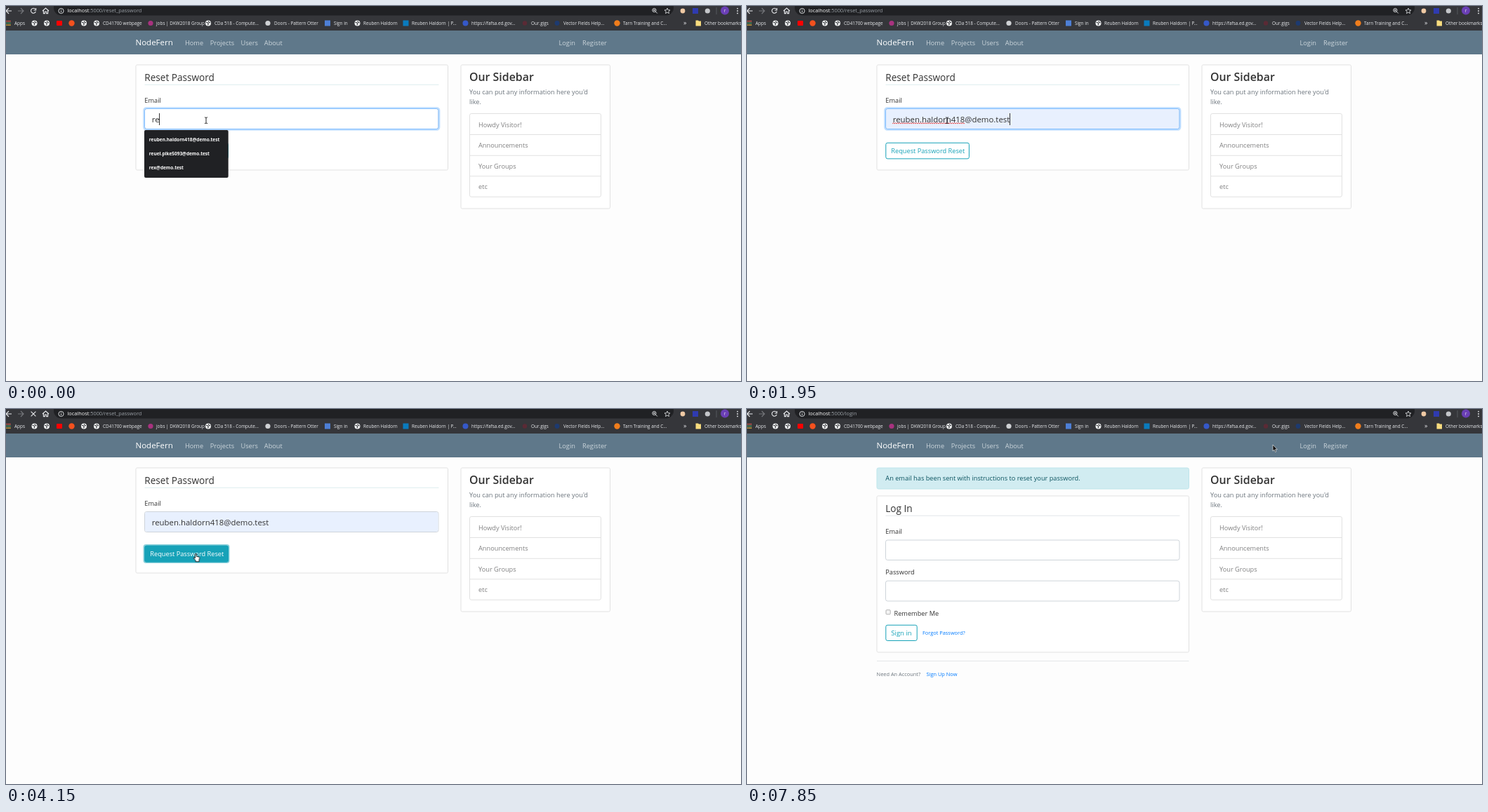
Animation of 1047 by 535 pixels, one loop 8000 ms. Source, as an HTML page:

```html
<!DOCTYPE html>
<html lang="en">
<head>
<meta charset="utf-8">
<title>Reset Password</title>
<style>
html, body { margin: 0; width: 100%; height: 100%; overflow: hidden; background: #fdfdfd; }
svg { display: block; width: 1047px; height: 535px; font: 9.22px "Open Sans", "Noto Sans", sans-serif; fill: #333; }
text { white-space: pre; }

.mark { font-size: 6.4px; fill: #e8eaed; }
.url { font-size: 7.35px; fill: #9aa0a6; }
.url tspan { fill: #fff; }
.icon { fill: none; stroke: #e8eaed; stroke-width: 1.1; }
.nav { fill: #cbd5db; }
.title { font-size: 13.6px; }
.small { font-size: 7.4px; }
.muted { fill: #6c757d; }
.item { fill: #818182; }
.link { fill: #007bff; }
.card { fill: #fff; stroke: #e1e1e1; }
.rule { stroke: #e3e6e8; }
.box { fill: #fff; stroke: #ced4da; }
.outline { fill: #fff; stroke: #17a2b8; }
.cyan { fill: #17a2b8; }
.typed { font-size: 11.4px; }
.drop { font-size: 6.5px; font-weight: 700; fill: #fff; }

/* Every track shares one 8 s clock; 1% is 80 ms. */
.k { animation: 8s step-end infinite; }
.smooth { animation: 8s linear infinite; }

.reset { animation-name: until6330; }
.login { animation-name: from6330; }
@keyframes until6330 { 0% { opacity: 1 } 79.125%, 100% { opacity: 0 } }
@keyframes from6330 { 0% { opacity: 0 } 79.125%, 100% { opacity: 1 } }

.w1 { animation-name: until710; }
.w2 { animation-name: w2; }
.w3 { animation-name: w3; }
.w4 { animation-name: w4; }
.w5 { animation-name: from1670; }
.row2 { animation-name: until890; }
.row3 { animation-name: until710; }
.list { animation-name: until1950; }
.pick { animation-name: from1670; }
.panel { animation-name: panel; }
@keyframes until710 { 0% { opacity: 1 } 8.875%, 100% { opacity: 0 } }
@keyframes until890 { 0% { opacity: 1 } 11.125%, 100% { opacity: 0 } }
@keyframes until1950 { 0% { opacity: 1 } 24.375%, 100% { opacity: 0 } }
@keyframes from1670 { 0% { opacity: 0 } 20.875%, 100% { opacity: 1 } }
@keyframes w2 { 0% { opacity: 0 } 8.875% { opacity: 1 } 11.125%, 100% { opacity: 0 } }
@keyframes w3 { 0% { opacity: 0 } 11.125% { opacity: 1 } 12.25%, 100% { opacity: 0 } }
@keyframes w4 { 0% { opacity: 0 } 12.25% { opacity: 1 } 20.875%, 100% { opacity: 0 } }
@keyframes panel { 0% { height: 68px } 8.875% { height: 48.5px } 11.125%, 100% { height: 29px } }

.caret { animation-name: caretx, blink; }
@keyframes caretx {
  0% { transform: translateX(218px) } 8.875% { transform: translateX(226px) }
  11.125% { transform: translateX(239px) } 12.25% { transform: translateX(246px) }
  24.375%, 100% { transform: translateX(374px) }
}
@keyframes blink {
  0% { opacity: 1 } 5% { opacity: 0 } 8.875% { opacity: 1 } 19.625% { opacity: 0 }
  24.375% { opacity: 1 } 31.75% { opacity: 0 } 38.375% { opacity: 1 } 44.625%, 100% { opacity: 0 }
}
.spell { animation-name: spell; }
@keyframes spell { 0% { opacity: 0 } 24.375% { opacity: 1 } 49.75%, 100% { opacity: 0 } }

.focus { animation-name: blur; }
@keyframes blur { 0%, 49.75% { opacity: 1 } 51.875%, 100% { opacity: 0 } }
.hover { animation-name: hover; }
@keyframes hover { 0%, 39% { opacity: 0 } 40.9%, 100% { opacity: 1 } }
.ring { animation-name: ring; }
@keyframes ring { 0%, 49.75% { opacity: 0 } 51.875%, 100% { opacity: 1 } }

.path1 { animation-name: until5780; }
.path2 { animation-name: from5780; }
@keyframes until5780 { 0% { opacity: 1 } 72.25%, 100% { opacity: 0 } }
@keyframes from5780 { 0% { opacity: 0 } 72.25%, 100% { opacity: 1 } }
.idle { animation-name: idle; }
.busy { animation-name: busy; }
@keyframes idle { 0% { opacity: 1 } 49.75% { opacity: 0 } 92.375%, 100% { opacity: 1 } }
@keyframes busy { 0% { opacity: 0 } 49.75% { opacity: 1 } 92.375%, 100% { opacity: 0 } }

.mouse { animation-name: mouse; }
@keyframes mouse {
  0%, 33% { transform: translate(285px, 163px) }
  41.25% { transform: translate(272px, 204px) }
  43.5% { transform: translate(270.5px, 206px); animation-timing-function: step-end }
  92.375% { transform: translate(300px, 195px); animation-timing-function: step-end }
  93.5% { transform: translate(372px, 167px); animation-timing-function: step-end }
  94.625% { transform: translate(443px, 140px); animation-timing-function: step-end }
  96.875% { transform: translate(600px, 95px); animation-timing-function: step-end }
  98.125%, 100% { transform: translate(749px, 51px) }
}
.beam { animation-name: beam; }
.arrow { animation-name: arrow; }
.hand { animation-name: hand; }
@keyframes beam { 0% { opacity: 1 } 35.75%, 100% { opacity: 0 } }
@keyframes arrow { 0% { opacity: 0 } 35.75% { opacity: 1 } 39% { opacity: 0 } 92.375%, 100% { opacity: 1 } }
@keyframes hand { 0% { opacity: 0 } 39% { opacity: 1 } 92.375%, 100% { opacity: 0 } }
</style>
</head>
<body>
<svg viewBox="0 0 1047 535">
  <defs>
    <g id="globe">
      <circle r="4" fill="#f1f3f4"/>
      <path d="M-3-1.2L-.6-.6L.4.8L-.6 2.8M.2-3L1-1.4L3-.6" fill="none" stroke="#35363a" stroke-width="1.1"/>
    </g>
    <pattern id="wave" x="207" y="166" width="3" height="3" patternUnits="userSpaceOnUse">
      <path d="M0 2L1.5 .7L3 2" fill="none" stroke="#e53935" stroke-width=".9"/>
    </pattern>
  </defs>

  <!-- browser toolbar -->
  <rect width="1047" height="35" fill="#35363a"/>
  <rect x="68" y="-9" width="883" height="22.5" rx="11" fill="#202124"/>
  <g class="icon">
    <path d="M8 7H0M4 3L0 7L4 11"/>
    <path d="M17 7H25M21 3L25 7L21 11" stroke="#77797d"/>
    <path class="k idle" d="M41.6 4.4A3.5 3.5 0 1 0 42.3 8M42.6 3V6H39.6"/>
    <path class="k busy" d="M35.6 3.6L42.4 10.4M42.4 3.6L35.6 10.4"/>
    <path d="M52 7L56.5 3L61 7M53.4 6.5V10.6H55.4V8H57.6V10.6H59.6V6.5"/>
    <circle cx="78.5" cy="7" r="3.6" stroke-width=".9"/>
    <path d="M78.5 6.5V9M78.5 4.7V5.6" stroke-width=".9"/>
    <circle cx="923.4" cy="6" r="2.6" stroke-width=".9"/>
    <path d="M925.3 8L927.8 10.5M922.1 6H924.7M923.4 4.7V7.3" stroke-width=".9"/>
    <path d="M942 3L943.1 5.7L946 5.9L943.8 7.8L944.5 10.6L942 9.1L939.5 10.6L940.2 7.8L938 5.9L940.9 5.7Z" stroke-width=".8"/>
    <path d="M1012 2V12" stroke="#5f6368" stroke-width=".8"/>
  </g>
  <text class="url k path1" x="87.5" y="9.4"><tspan>localhost</tspan>:5000/reset_password</text>
  <text class="url k path2" x="87.5" y="9.4"><tspan>localhost</tspan>:5000/login</text>
  <circle cx="964" cy="7" r="3.4" fill="#efc9a4"/>
  <rect x="978" y="3" width="8" height="8" fill="#2f3bb0"/>
  <circle cx="999.3" cy="7" r="3.6" fill="#c4c6ca"/>
  <circle cx="1024" cy="6.5" r="6" fill="#6a3fb5"/>
  <text class="mark" x="1024" y="8.8" text-anchor="middle">r</text>
  <g fill="#e8eaed"><circle cx="1042" cy="3.6" r=".9"/><circle cx="1042" cy="7" r=".9"/><circle cx="1042" cy="10.4" r=".9"/></g>

  <!-- bookmarks -->
  <g stroke-width="1.8" stroke-dasharray="1.8 .9">
    <path d="M-.8 21.7H7" stroke="#ea5a4f"/><path d="M-.8 24.4H7" stroke="#4aa564"/><path d="M-.8 27.1H7" stroke="#e9b53a"/>
  </g>
  <use href="#globe" x="40.5" y="24.5"/><use href="#globe" x="58" y="24.5"/>
  <rect x="72" y="21" width="8" height="7" rx="1" fill="#f00"/>
  <circle cx="93.5" cy="24.5" r="4.2" fill="#f4511e"/>
  <use href="#globe" x="111" y="24.5"/><use href="#globe" x="129" y="24.5"/>
  <circle cx="206" cy="24.5" r="3.6" fill="#a8327f"/>
  <use href="#globe" x="288" y="24.5"/>
  <circle cx="373" cy="24.5" r="3.6" fill="#cfd1d4"/>
  <rect x="454" y="20.5" width="8" height="8" fill="#4d7fd6"/>
  <use href="#globe" x="500.5" y="24.5"/>
  <rect x="565.5" y="20.5" width="8" height="8" fill="#0a7bbd"/>
  <circle cx="654.5" cy="24.5" r="4" fill="#3558c8"/>
  <circle cx="739" cy="24.5" r="3.2" fill="#5a2a35"/>
  <circle cx="785" cy="24.5" r="3.4" fill="#1d3a70"/>
  <circle cx="870.5" cy="24.5" r="4.2" fill="#f07d1c"/>
  <path d="M982.5 20.5H986L987 21.5H990V28.5H982.5Z" fill="#f7dc7e"/>
  <g class="mark">
    <text x="12" y="26.8">Apps</text>
    <text x="138" y="26.8">CD41700 webpage</text>
    <text x="214" y="26.8">jobs | DKW2018 Group</text>
    <text x="297" y="26.8">CDa 518 - Compute...</text>
    <text x="382" y="26.8">Doors - Pattern Otter</text>
    <text x="467" y="26.8">Sign in</text>
    <text x="509" y="26.8">Reuben Haldorn</text>
    <text x="578" y="26.8">Reuben Haldorn | P...</text>
    <text x="663" y="26.8">https://fafsa.ed.gov...</text>
    <text x="748" y="26.8">Our.gigs</text>
    <text x="794" y="26.8">Vector Fields Help...</text>
    <text x="879" y="26.8">Tarn Training and C...</text>
    <text x="965" y="27" font-size="9">»</text>
    <text x="995" y="26.8">Other bookmarks</text>
  </g>

  <!-- site header -->
  <rect y="35" width="1047" height="34" fill="#5f788a"/>
  <text x="184.5" y="56.4" font-size="11.5" fill="#fff">NodeFern</text>
  <g class="nav">
    <text x="255" y="55.8">Home</text>
    <text x="290.8" y="55.8">Projects</text>
    <text x="334.5" y="55.8">Users</text>
    <text x="367.8" y="55.8">About</text>
    <text x="787.5" y="55.8">Login</text>
    <text x="821" y="55.8">Register</text>
  </g>

  <!-- sidebar -->
  <rect class="card" x="648" y="84" width="212.5" height="205" rx="1.8"/>
  <text x="660" y="106.8" font-size="15.9" font-weight="600">Our Sidebar</text>
  <g class="muted">
    <text x="660" y="126.2">You can put any information here you'd</text>
    <text x="660" y="140.4">like.</text>
  </g>
  <rect class="card" x="660.5" y="153.5" width="187" height="118.8" rx="2.4"/>
  <path class="card" d="M660.5 183.5H847.5M660.5 213.3H847.5M660.5 242.8H847.5"/>
  <g class="item">
    <text x="673" y="172.6">Howdy Visitor!</text>
    <text x="673" y="202.2">Announcements</text>
    <text x="673" y="232">Your Groups</text>
    <text x="673" y="261.4">etc</text>
  </g>

  <!-- reset form -->
  <g class="k reset">
    <rect class="card" x="185" y="84" width="444.5" height="150" rx="1.8"/>
    <text class="title" x="197.3" y="106.7">Reset Password</text>
    <path d="M197.5 112.3H616.5" stroke="#dcedee"/>
    <text x="197.3" y="138.2">Email</text>
    <rect class="box" x="197.5" y="146.5" width="418.5" height="29" rx="2.8"/>
    <rect class="k pick" x="198" y="147" width="417.5" height="28" rx="2.4" fill="#e8f0fe"/>
    <g class="smooth focus" fill="none">
      <rect x="196.2" y="145.2" width="421.2" height="31.6" rx="3.8" stroke="#bfdeff" stroke-width="2"/>
      <rect x="197.5" y="146.5" width="418.5" height="29" rx="2.8" stroke="#80bdff"/>
    </g>
    <g class="typed">
      <text class="k w1" x="207.8" y="166">re</text>
      <text class="k w2" x="207.8" y="166">reu</text>
      <text class="k w3" x="207.8" y="166">reube</text>
      <text class="k w4" x="207.8" y="166">reuben</text>
      <text class="k w5" x="207.8" y="166">reuben.haldorn418@demo.test</text>
    </g>
    <rect class="k spell" x="207" y="166" width="103" height="3" fill="url(#wave)"/>
    <rect class="k caret" y="153" width="1" height="17"/>

    <rect class="smooth ring" x="196.5" y="194" width="121" height="25" rx="3" fill="none" stroke="#8bd0db" stroke-width="2"/>
    <rect class="outline" x="197.8" y="195.3" width="118.6" height="22.6" rx="2.4"/>
    <text class="cyan" x="205.3" y="210.4">Request Password Reset</text>
    <g class="smooth hover">
      <rect class="cyan" x="197.3" y="194.8" width="119.6" height="23.6" rx="2.6"/>
      <text x="205.3" y="210.4" fill="#fff">Request Password Reset</text>
    </g>

    <g class="k list drop">
      <rect class="k panel" x="197" y="177" width="119.7" height="68" rx="2" fill="#202124"/>
      <rect class="k pick" x="197" y="181" width="119.7" height="20" fill="#3f4045"/>
      <text x="203.8" y="193.4">reuben.haldorn418@demo.test</text>
      <text class="k row2" x="203.8" y="213.4">reuel.pike5093@demo.test</text>
      <text class="k row3" x="203.8" y="233.4">rex@demo.test</text>
    </g>
  </g>

  <!-- login form -->
  <g class="k login">
    <rect x="185" y="84" width="444.5" height="30" rx="2.4" fill="#d1ecf1" stroke="#bee5eb"/>
    <text x="197.3" y="102.3" fill="#0c5460">An email has been sent with instructions to reset your password.</text>
    <rect class="card" x="185" y="124" width="444.5" height="223" rx="1.8"/>
    <text class="title" x="197.3" y="146.8">Log In</text>
    <path class="rule" d="M197.5 152.2H616.5"/>
    <text x="197.3" y="178.2">Email</text>
    <rect class="box" x="197.5" y="187" width="418.5" height="28.5" rx="2.8"/>
    <text x="197.3" y="236.4">Password</text>
    <rect class="box" x="197.5" y="245.2" width="418.5" height="28.8" rx="2.8"/>
    <rect x="198" y="286.7" width="6.2" height="6.2" rx="1" fill="#f4f4f4" stroke="#a0a0a0" stroke-width=".8"/>
    <text x="209.5" y="294.5">Remember Me</text>
    <rect class="outline" x="197.8" y="308.3" width="44.4" height="22.2" rx="2.4"/>
    <text class="cyan" x="205.3" y="322.9" font-size="9.5">Sign in</text>
    <text class="small link" x="250" y="321.8">Forgot Password?</text>
    <path class="rule" d="M185 359.6H629.5"/>
    <text class="small muted" x="184.6" y="380.6">Need An Account?</text>
    <text class="small link" x="255.5" y="380.6">Sign Up Now</text>
  </g>

  <!-- pointer -->
  <g class="smooth mouse">
    <path class="k beam" d="M-2-4.2Q0-4.2 0-3.2Q0-4.2 2-4.2M0-3.2V3.6M-2 4.6Q0 4.6 0 3.6Q0 4.6 2 4.6" fill="none" stroke="#111" stroke-width=".9"/>
    <path class="k arrow" d="M0 0V9L2 7.2L3.5 10.4L4.9 9.8L3.5 6.7H6.3Z" fill="#111" stroke="#fff" stroke-width=".6"/>
    <path class="k hand" d="M-1 1Q0-.4 1 1V4.4L4.4 5Q5.4 5.4 5.3 6.6L4.6 9.4V11.8H-.4V10.2L-3 7Q-3.4 5.6-2 5.9L-1 6.8Z" fill="#fff" stroke="#111" stroke-width=".9" stroke-linejoin="round"/>
  </g>
</svg>
</body>
</html>
```
